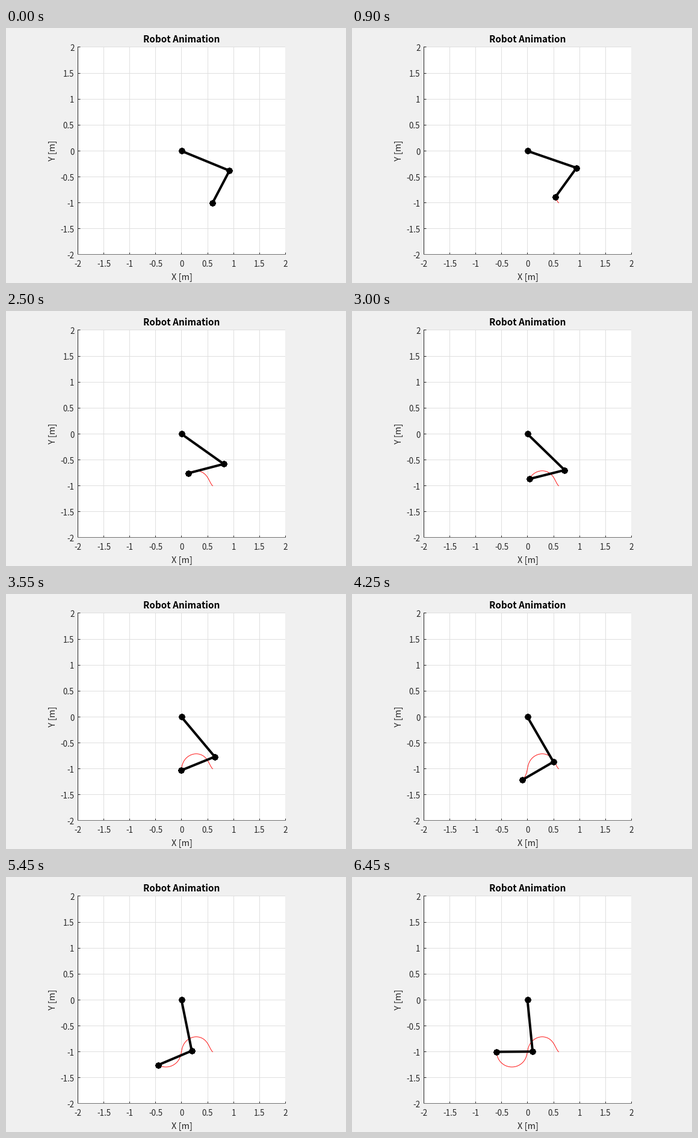
These frames come from a looping animation (565 px wide and 424 px high, 6500 ms). A matplotlib script:

```python
import numpy as np
import matplotlib.pyplot as plt
from matplotlib.animation import FuncAnimation
from matplotlib.transforms import Affine2D

W, H, DPI = 565, 424, 64
PX = 72 / DPI                          # points per pixel
LEFT, TOP, SIZE = 118.95, 31.45, 345   # plot area in pixels
UNIT = SIZE / 4
L1, L2 = 1.0, 0.7
STEPS, HOLD = 120, 10
INK = "#262626"

plt.rcParams["font.family"] = "Noto Sans CJK JP"


def smooth(v, half=7):
    """Moving average that keeps both end points."""
    padded = np.pad(v, half, mode="reflect", reflect_type="odd")
    n = 2 * half + 1
    return np.convolve(padded, np.ones(n) / n, mode="valid")


def wanted_path(k):
    """Two half circles of radius 0.3 forming a soft S."""
    a = np.radians(3 * k)
    first = k <= STEPS / 2
    x = np.where(first, 0.3 + 0.3 * np.cos(a), -0.3 - 0.3 * np.cos(a))
    return smooth(x), smooth(-1 + 0.3 * np.sin(a))


def inverse(x, y):
    r2 = x**2 + y**2
    q2 = -np.arccos((r2 - L1**2 - L2**2) / (2 * L1 * L2))
    inner = np.arccos((L1**2 + r2 - L2**2) / (2 * L1 * np.sqrt(r2)))
    return np.arctan2(y, x) + inner, q2


def from_rest(q, k, tau):
    """Critically damped catch-up of a joint that starts standing still."""
    return q - (q[1] - q[0]) * k * np.exp(-k / tau)


k = np.arange(STEPS + 1)
q1, q2 = inverse(*wanted_path(k))
q1, q2 = from_rest(q1, k, 8.4), from_rest(q2, k, 3.2)
elbow_x, elbow_y = L1 * np.cos(q1), L1 * np.sin(q1)
tip_x = elbow_x + L2 * np.cos(q1 + q2)
tip_y = elbow_y + L2 * np.sin(q1 + q2)

fig = plt.figure(figsize=(W / DPI, H / DPI), dpi=DPI, facecolor="#f0f0f0")
ax = fig.add_axes([LEFT / W, 1 - (TOP + SIZE) / H, SIZE / W, SIZE / H])
ax.set(xlim=(-2, 2), ylim=(-2, 2))
ticks = np.arange(-2, 2.1, 0.5)
ax.set_xticks(ticks)
ax.set_yticks(ticks)
ax.set_axisbelow(True)
ax.grid(color="#dfdfdf", lw=PX)
ax.tick_params(direction="in", length=3.5 * PX, width=PX, color=INK,
               labelbottom=False, labelleft=False)
for side in ("top", "right"):
    ax.spines[side].set_visible(False)
for side, color in (("left", INK), ("bottom", "#707070")):
    ax.spines[side].set(color=color, linewidth=PX)


def label(x, y, text, size, ha="center", color=INK, **kw):
    fig.text(x / W, 1 - y / H, text, size=size * PX, ha=ha, va="baseline",
             color=color, **kw)


for v in ticks:
    label(LEFT + 0.5 + (v + 2) * UNIT, 397, f"{v:g}", 13.3)
    label(113.3, TOP + (2 - v) * UNIT + 6.6, f"{v:g}", 13.3, ha="right")
label(292, 24, "Robot Animation", 15.2, color="black", weight="bold")
label(292, 419, "X [m]", 14.6)
label(82, 204.3, "Y [m]", 14.6, rotation=90, rotation_mode="anchor")

# Lines are aimed at pixel centres, the grid at pixel edges
nudge = ax.transData + Affine2D().translate(0.1, -0.5)
trace, = ax.plot([], [], color="red", lw=0.9 * PX, zorder=3, transform=nudge)
arm, = ax.plot([], [], color="black", lw=4 * PX, marker=(8, 2, 0),
               ms=10.4 * PX, mew=3 * PX, zorder=4, transform=nudge)


def draw(frame):
    i = max(0, frame - HOLD + 1)
    trace.set_data(tip_x[:i + 1], tip_y[:i + 1])
    arm.set_data([0, elbow_x[i], tip_x[i]], [0, elbow_y[i], tip_y[i]])
    return trace, arm


anim = FuncAnimation(fig, draw, frames=HOLD + STEPS, interval=50,
                     repeat=True, repeat_delay=0)
plt.show()
```
